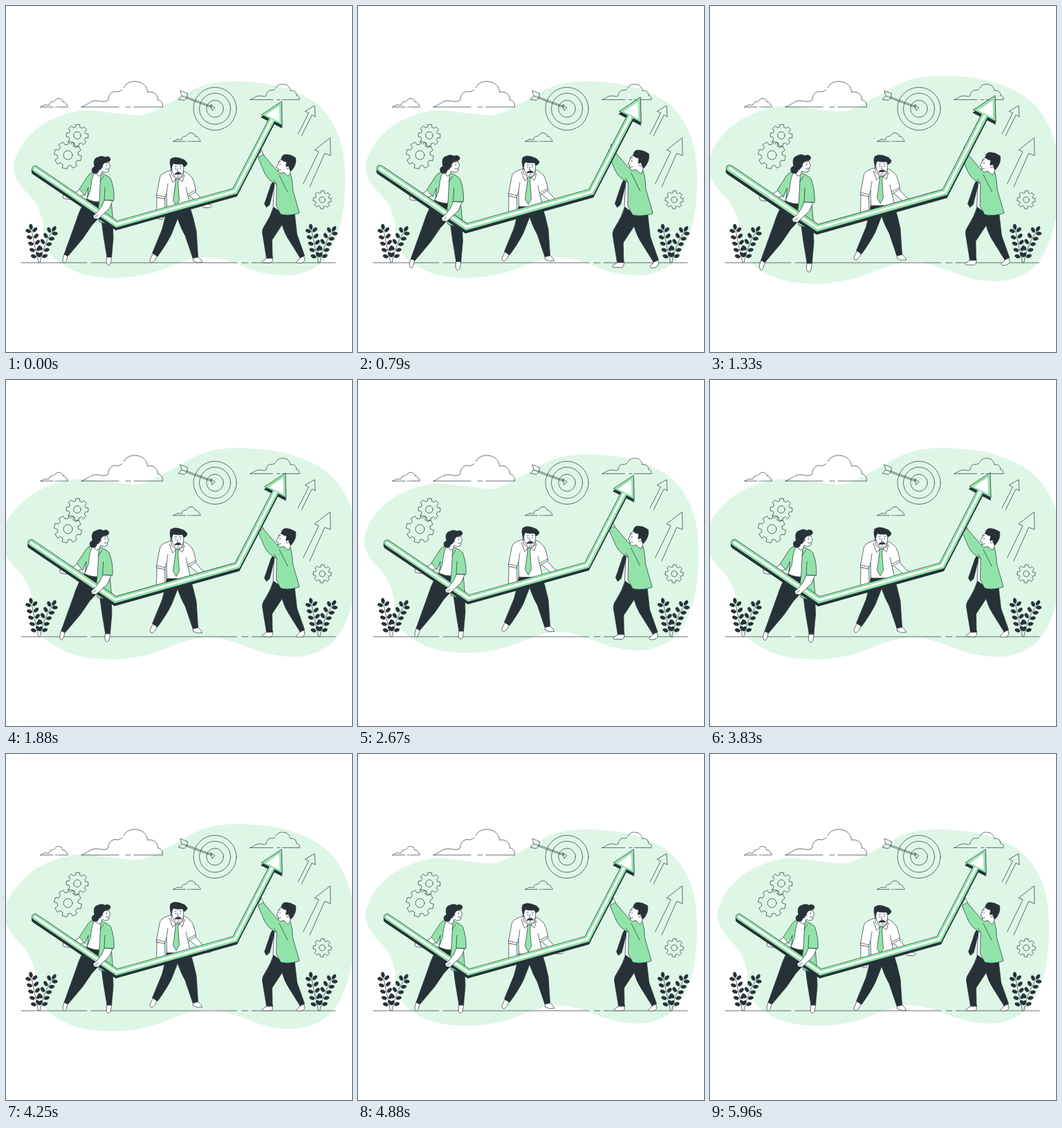
Write an HTML page that moves like this. It is 500x500 px and loops after 6000 ms.

```html
<!DOCTYPE html>
<html lang="en">
<head>
<meta charset="utf-8">
<title>Growth arrow</title>
<style>
  html, body { margin: 0; width: 100%; height: 100%; overflow: hidden; background: #fff; }
  svg { display: block; width: 100%; height: 100%; }
  path, circle, use { fill: none; stroke: #263238; stroke-width: .7; stroke-linejoin: round; stroke-linecap: round; }
  .dark { fill: #263238; }
  .white { fill: #fff; }
  .green { fill: #92e3a9; }
  .cloud { vector-effect: non-scaling-stroke; }
  .shape { fill: inherit; stroke: inherit; stroke-width: inherit; }
  #bar { stroke-linejoin: miter; }
  #blob path { fill: #def6e6; stroke: none; }
  #plant ellipse { fill: #263238; }
</style>
</head>
<body>
<svg viewBox="0 0 500 500">
  <defs>
    <path id="cloud" class="cloud" d="M0 37C8 34 11 30 17 28.500C24 26 33 32 38.500 27C39 19 43 15 49 14.500C54 16 57 13 59 12
      M61.500 9C64 2 71 0 77 0C88 0 95 7 95.500 15.500C104 13 111 20 110.500 27C115 27 118 31 117.500 37H76M71 37H64M54 37H0"/>
    <path id="bar" class="shape" d="M42 235.500L160 315.500L331 267.500L384 165"/>
    <path id="head" class="shape" d="M398 138L369 157L399 172.500Z"/>
    <g id="plant"></g>
  </defs>

  <g id="blob"></g>

  <g id="scenery">
    <use href="#cloud" transform="translate(109 109)"/>
    <use href="#cloud" transform="translate(50 133.600) scale(.335)"/>
    <use href="#cloud" transform="translate(241.500 183.300) scale(.335)"/>
    <use href="#cloud" transform="translate(353 113) scale(.605)"/>

    <circle cx="302" cy="148.500" r="31"/>
    <circle cx="302" cy="148.500" r="22.500"/>
    <circle cx="302" cy="148.500" r="12.300"/>
    <path d="M261 131.500L298 145.200M260.500 133.300L297.500 146.800M296 142.500L302 147L298 151ZM252 122.500L262.500 126.500L261.500 132.500L257.500 136.500L249 135L254 130ZM254 130L261 132.500"/>

    <path d="M422 185L437.500 154.500L432 152L446 144L447 160L442 157.500L427 188"/>
    <path d="M429.500 257L452 210.500L446 208L468.500 190.500L469 216L460.500 213L439 261.500"/>
    <path d="M22 371H117M123 371H333.500M341 371H350M355 371H476"/>
    <use href="#plant"/>
    <use href="#plant" x="404.500"/>
  </g>

  <g id="lifter">
    <path class="white" d="M373 217L368.500 206.500L367.500 212L364.500 216L367 222Z"/>
    <path class="white" d="M377 363L376 365L370.500 368.500Q369 371 373 371H383Q386 369 385.500 363Z"/>
    <path class="white" d="M425 361L424.500 365L420 369.500Q420 372 425 371.500Q431 371 432 366L430 360Z"/>
    <path class="dark" d="M387 289Q383 303 374 317Q369 324 371 331L376.500 364.500H385L384.500 338L399 316Q403 330 410 340L425 364L431.500 361L420.500 330L417 299Z"/>
    <path class="white" d="M388 252L386 290L394 296L400 260Z"/>
    <path class="dark" d="M387 252L383 258L373.500 286L376.500 291L381 287L387.500 261Z"/>
    <path class="green" d="M364.500 219L371.500 214.500L391 237.500Q396 241 411 242Q414 252 414.500 266L424 299Q410 304 397 301L390.500 289L391 258Q379 252 374 242Z"/>
    <path d="M391 258L387.500 252M395 245L407 269"/>
    <path class="white" d="M399 220L394.500 224L393 229L390.500 233.500L393 234.500L393.500 240Q396 243 401 240.500L408 246L411 241L411 224Z"/>
    <path class="dark" d="M398 222Q398 215 404 214.500Q412 214.500 418.500 219.500Q420.500 229 412 238.500Q409.500 238 409.500 233Q409 230 406 232L404.500 232L405.500 225.500Q401 225 398 222Z"/>
    <path d="M396 228V230M394 225.500L397 224.500M394 237.500L397 236.500M405.500 232Q409 229.500 409 234Q407 237 405 234.500"/>
  </g>

  <g id="holder">
    <path class="white" d="M212 358L208 367Q207.500 371 212 370.500Q217 367 218.500 360Z"/>
    <path class="white" d="M270 361L270.500 368.500Q276 372 283.500 370.500Q283 367 277 362Z"/>
    <path class="dark" d="M233 288Q230 308 225.500 323L211.500 357L219 362Q232 344 239 330L248 307Q253 322 259 332L270 364.500L277.500 363L275 325Q271 306 265 288Z"/>
    <path class="white" d="M218 277L217.500 302L220 308L226 308.500L230 300L229.500 278Z"/>
    <path class="white" d="M264 273L276 283L286 291.500L295 291.500L297.500 289L283 279.500L273 268Z"/>
    <path class="white" d="M240 237Q224 241 222.500 247L217 276L229 279L232 270L232.500 292H267L263 275L274.500 268.500Q272 250 267 246Q263 241 256 238Z"/>
    <path d="M232 270L234 257M263 275L260 262M217.500 273L229.500 276M262.500 272L274 266"/>
    <path class="green" d="M245 250L250 250L248.500 255L250.500 281L246 289L241.500 281L245 255Z"/>
    <path class="white" d="M239.500 227Q239 239 243 245Q247 250 251 249Q256 246 256.500 237L257 228Z"/>
    <path d="M238.500 236L239 244L246 250L241 255L236 242M256 240L256 246L250 250L255 254L258 244"/>
    <path class="dark" d="M239 235Q235.500 228 238 221Q243 217.500 250 219.500L258 222.500L262 227Q261.500 231 257 232.500L255 228.500Q246 229.500 242 227.500L240.500 230Z"/>
    <path class="dark" d="M244 243.500Q244.500 240.500 248.500 240.500Q252.500 240 254 243Q250.500 242.500 249 243.500Q246.500 242.500 244 243.500Z"/>
    <path d="M245.500 234V236M252 234V236M244 232L246.500 231.500M251 231.500L253.500 232M248.500 235L247.500 239L250 239.500M248 246H251M238.500 232Q236.500 236 240 238"/>
  </g>

  <g id="carrier">
    <path class="white" d="M84 359L82 366Q82 372 85 371.500Q88 369 89 361Z"/>
    <path class="white" d="M146 362L145 369Q146 375 149 374.500Q152 373 152.500 362Z"/>
    <path class="dark" d="M117 278Q107 292 102 309L84 359L89.500 361.500L111 336L124 317L137 303L141 333L146 363H152.500L155 335L154 312L136 280Z"/>
    <path class="white" d="M108 264L101 269L88 271L82 274L83 278L90 279.500L104 276L114 272Z"/>
    <path class="white" d="M125 241L121 260L117 279Q127 284 137 283L139 246L134 240Z"/>
    <path class="green" d="M125 240.500Q120 242 118 246L106 264.500L114 274L119 262L118 276L122 266Q123 252 127 241Z"/>
    <path class="green" d="M137 241L135 279L132 303L135 312Q145 316 155 314L152 281H156Q157 264 151 249Q147 245 137 241Z"/>
    <path d="M143 262L142 281L152 281M141 246L136 254"/>
    <path class="white" d="M131 236V242Q133 249 138 243L139 239Q145 242 148.500 239L149 234L151 232L149 228L147 222L137 223Z"/>
    <circle class="dark" cx="129" cy="237.300" r="5"/>
    <path class="dark" d="M127.500 230Q125.500 220 133 218.500Q138 215.500 143 218.500Q149 216 151 221Q151 225 145 225.500Q140 227 139 232L136 237Q129 238 127.500 230Z"/>
    <path d="M145.500 229V231M144 226.500L147 226.500M144 235.500Q146 237 148 235.500M137 231Q140 229 140 233L137.500 235"/>

    <g transform="translate(-.5 3.700)"><use href="#bar" style="stroke-width:9.500"/><use href="#head" class="dark"/></g>
    <use href="#bar" style="stroke-width:9.800"/>
    <use href="#head" class="green"/>
    <use href="#bar" style="stroke:#92e3a9;stroke-width:8.600"/>
    <path class="white" d="M395 144L375.500 157.500L395.500 167.500Z" style="stroke:none"/>
    <use href="#bar" style="stroke:#fff;stroke-width:3"/>

    <path class="white" d="M142 281L138 290L131 299L126 303L127 307L133 308L137 304L149 293L154 281.500Z"/>
    <path d="M129 305L133 302"/>
  </g>
</svg>
<script>
const $ = id => document.getElementById(id);
const add = (id, markup) => $(id).insertAdjacentHTML('beforeend', markup);

// Closed smooth curve through points
function smooth(pts) {
  const n = pts.length, at = i => pts[(i + n) % n];
  let d = 'M' + pts[0];
  for (let i = 0; i < n; i++) {
    const [a, b, c, e] = [at(i - 1), at(i), at(i + 1), at(i + 2)];
    d += 'C' + [0, 1].map(k => b[k] + (c[k] - a[k]) / 6) + ' '
             + [0, 1].map(k => c[k] - (e[k] - b[k]) / 6) + ' ' + c;
  }
  return d + 'Z';
}
add('blob', `<path d="${smooth([
  [11, 235], [22, 202], [56, 169], [108, 151], [160, 155], [200, 157], [240, 138], [285, 115],
  [335, 109], [398, 117], [451, 143], [480, 186], [490, 242], [484, 313], [460, 366], [420, 388],
  [372, 386], [325, 370], [290, 363], [255, 370], [210, 386], [160, 393], [110, 387], [71, 366],
  [55, 338], [53, 311], [42, 284], [22, 260]])}"/>`);

function gear(x, y, R, hole, turn) {
  const pts = [];
  for (let i = 0; i < 8; i++)
    for (const [da, r] of [[-.25, .77], [-.18, 1], [.18, 1], [.25, .77]]) {
      const a = i * Math.PI / 4 + turn + da;
      pts.push([(x + R * r * Math.cos(a)).toFixed(1), (y + R * r * Math.sin(a)).toFixed(1)]);
    }
  add('scenery', `<path d="M${pts.join('L')}Z"/><circle cx="${x}" cy="${y}" r="${hole}"/>`);
}
gear(103, 187, 16, 5.3, .05);
gear(89.5, 215.5, 20, 6.5, .25);
gear(457, 280, 13.3, 4.3, .05);

// Curved stem with paired leaves and one at the top
function stem(a, b, c) {
  add('plant', `<path d="M${a}Q${b} ${c}"/>`);
  const leaf = (x, y, deg) => add('plant',
    `<ellipse rx="3.7" ry="2.3" transform="translate(${x} ${y}) rotate(${deg})"/>`);
  for (let i = 0; i < 5; i++) {
    const t = .14 + i * .175, u = 1 - t;
    const [x, y] = [0, 1].map(k => u * u * a[k] + 2 * u * t * b[k] + t * t * c[k]);
    const dir = Math.atan2(u * (b[1] - a[1]) + t * (c[1] - b[1]), u * (b[0] - a[0]) + t * (c[0] - b[0]));
    for (const side of [-1, 1]) {
      const w = dir + side;
      leaf(x + 5.8 * Math.cos(w), y + 5.8 * Math.sin(w), w * 180 / Math.PI);
    }
  }
  leaf(c[0], c[1], Math.atan2(c[1] - b[1], c[0] - b[0]) * 180 / Math.PI);
}
stem([47, 371], [41, 345], [36, 319]);
stem([49, 371], [54, 343], [69.5, 322]);

const LOOP = 6000;
const BEAT = [[0, 1], [.1, 1.1], [.3, 1], [.4, 1], [.5, 1.1], [.6, 1], [1, 1]];

function beat(ms) {
  const p = ((ms / LOOP) % 1 + 1) % 1;
  const i = BEAT.findIndex(([at]) => at > p);
  const [t0, v0] = BEAT[i - 1], [t1, v1] = BEAT[i];
  return v0 + (v1 - v0) * (p - t0) / (t1 - t0);
}
const scale = (id, x, y, s) =>
  $(id).setAttribute('transform', `translate(${x} ${y}) scale(${s}) translate(${-x} ${-y})`);

const start = performance.now();
function draw() {
  const t = (performance.now() - start) % LOOP;
  scale('blob', 250, 250.5, beat(t - 980));
  scale('carrier', 220, 246, beat(t - 455));
  scale('lifter', 399, 290, beat(t));
  const lift = 8 * (1 - Math.abs(1 - 2 * t / LOOP));
  $('holder').setAttribute('transform', `translate(0 ${-lift})`);
  requestAnimationFrame(draw);
}
draw();
</script>
</body>
</html>
```
